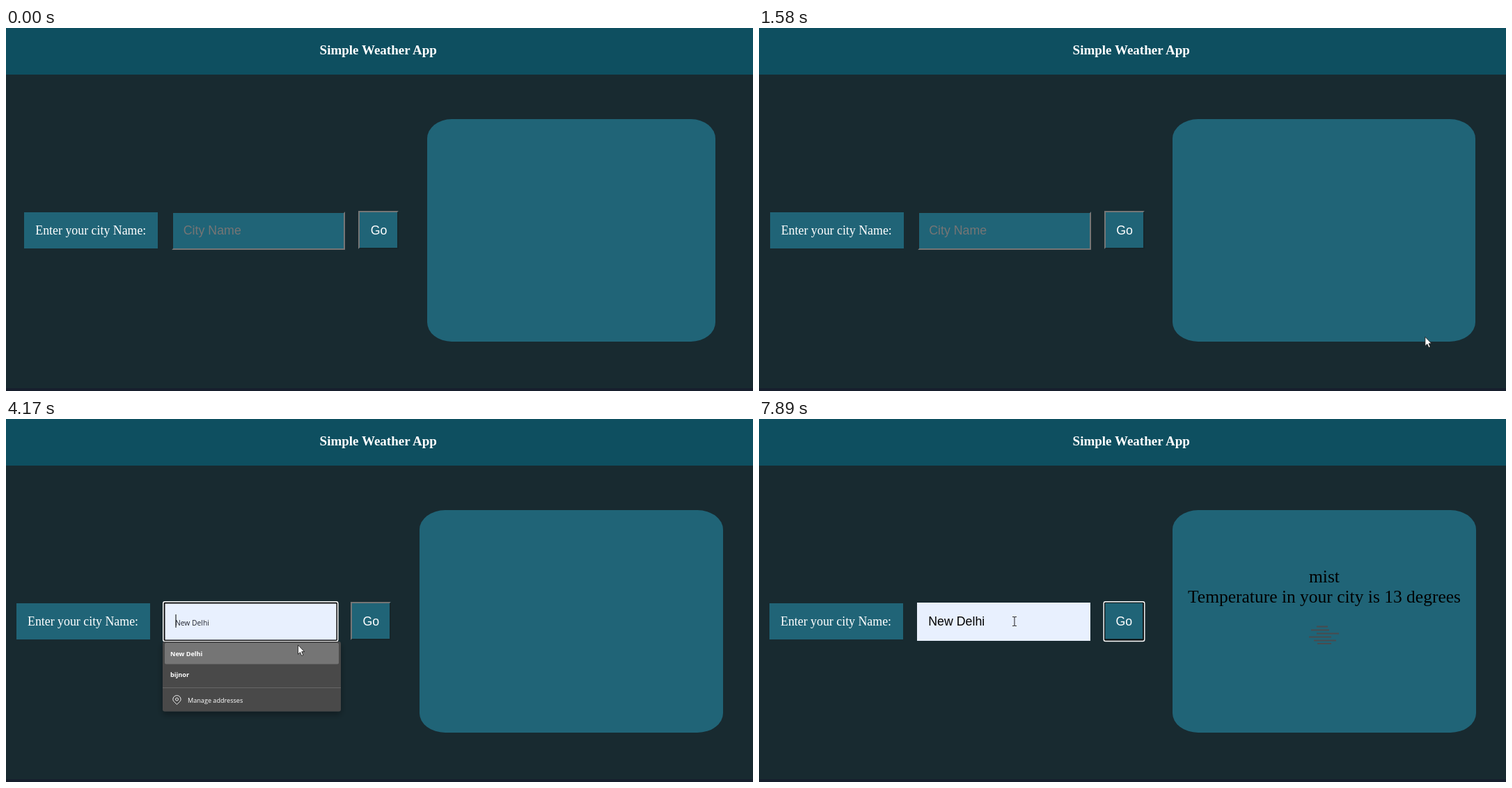
An HTML page that plays this animation: 1073 px wide and 522 px high, repeating every 8 s.

```html
<!DOCTYPE html>
<html lang="en">
<head>
<meta charset="utf-8">
<title>Simple Weather App</title>
<style>
  html, body { margin: 0; width: 100%; height: 100%; overflow: hidden; background: #182a30; }
  svg { display: block; width: 100vw; height: 100vh; }
  text { white-space: pre; }
  .serif { font-family: "Liberation Serif", "Times New Roman", serif; }
  .sans { font-family: "Liberation Sans", Arial, sans-serif; font-size: 17.8px; }
  .menu { font-family: "Open Sans", "Noto Sans", sans-serif; font-size: 9.1px; fill: #fff; }
  .bold { font-weight: 700; }
  .mid { text-anchor: middle; }
</style>
</head>
<body>
<svg viewBox="0 0 1073 522" preserveAspectRatio="none">
  <defs>
    <filter id="shadow" x="-10%" y="-10%" width="120%" height="135%">
      <feDropShadow dx="0" dy="4" stdDeviation="5" flood-color="#000" flood-opacity=".35"/>
    </filter>
  </defs>
  <rect width="1073" height="522" fill="#182a30"/>
  <rect width="1073" height="67" fill="#0e4f60"/>
  <rect y="518" width="1073" height="4" fill="#171f2d"/>
  <text class="serif bold mid" x="534.7" y="38" font-size="19" fill="#fff">Simple Weather App</text>

  <rect id="card" y="131" height="320" fill="#206477"/>
  <g id="result" class="serif mid" font-size="25.5" fill="#000">
    <text x="812" y="235">mist</text>
    <text x="812" y="264">Temperature in your city is 13 degrees</text>
    <path d="M801 298.5h16M793 303.5h26M801 308.5h32M790 313.5h32M797 318.5h32M802 323h20"
          stroke="#484b4f" stroke-width="2"/>
  </g>

  <g id="boxes">
    <rect x="15" y="265" width="192" height="52" fill="#206477"/>
    <rect id="field" x="227" y="264" width="249" height="55"/>
    <path id="inset" d="M476 264V319H227L229 317H474V266Z" fill="#767676"/>
    <path id="insetDark" d="M227 319V264H476L474 266H229V317Z" fill="#1b292d"/>
    <rect x="495" y="263" width="58" height="55" fill="#206477"/>
    <path id="outset" d="M495 318V263H553L551 265H497V316Z" fill="#767676"/>
    <path d="M553 263V318H495L497 316H551V265Z" fill="#16262b"/>
  </g>
  <g id="fieldRing" fill="none">
    <rect x="227.5" y="264.5" width="248" height="54" stroke="#101010" stroke-width="2"/>
    <rect x="225.75" y="262.75" width="251" height="57" rx="2.5" stroke="#fff" stroke-width="1.5"/>
  </g>
  <g id="goRing" fill="none">
    <rect x="496.5" y="264" width="56" height="54" stroke="#101010" stroke-width="1.5"/>
    <rect x="495.2" y="262.7" width="58.6" height="56.8" rx="2.5" stroke="#fff" stroke-width="1.4"/>
  </g>
  <g id="labels">
    <text class="serif" x="31" y="296.5" font-size="17.85" fill="#fff">Enter your city Name:</text>
    <text id="hint" class="sans" x="243.5" y="296.5" fill="#757575">City Name</text>
    <text class="sans" x="512.5" y="296.5" fill="#fff">Go</text>
  </g>
  <text id="value" class="sans" x="243.2" y="296.5" fill="#000">New Delhi</text>
  <text id="preview" class="menu" x="243" y="297" style="font-size:10.3px;fill:#23262e">New Delhi</text>
  <rect id="caret" y="281" width="1" height="19"/>

  <g id="menu">
    <rect x="225" y="320" width="256" height="100.5" rx="3" fill="#4a4a4a" filter="url(#shadow)"/>
    <rect id="hover" x="228" y="322" width="250" height="30.5" rx="2" fill="#757575"/>
    <text class="menu bold" x="236" y="341">New Delhi</text>
    <text class="menu bold" x="236" y="371">bijnor</text>
    <path d="M225 386.5H481" stroke="#666"/>
    <path d="M245.5 410.5C242 407 239.8 405.5 239.8 403.2A5.6 5.6 0 0 1 251.1 403.2C251.1 405.5 249 407 245.5 410.5Z"
          fill="none" stroke="#eee"/>
    <circle cx="245.5" cy="403" r="2" fill="none" stroke="#eee"/>
    <text class="menu" x="261" y="408">Manage addresses</text>
  </g>

  <circle id="click" r="9.5" fill="#ffff00" fill-opacity=".52"/>
  <path id="arrow" d="M0 0V13.2L3 10.4L5.2 15.4L7.4 14.4L5.2 9.6H9.2Z" fill="#fff" stroke="#101010" stroke-width=".8"/>
  <path id="beam" d="M-3 -6.5H-1L0 -5.7L1 -6.5H3M0 -5.7V5.7M-3 6.5H-1L0 5.7L1 6.5H3" fill="none" stroke-width="1.1"/>
</svg>
<script>
const LOOP = 8000;
const $ = Object.fromEntries([...document.querySelectorAll('svg [id]')].map(el => [el.id, el]));

// Pointer stops: time, x, y
const stops = [
  [160, 862, 530], [490, 907, 451], [1110, 943, 443], [1890, 966, 445], [2220, 974, 446],
  [2540, 977, 446], [2610, 977, 446], [3310, 411, 308], [4010, 411, 308], [4170, 419.5, 325],
  [4330, 419.5, 328.5], [4960, 419.5, 328.5], [5270, 518, 298], [6950, 518, 298],
  [7260, 819, 435], [7810, 360, 291], [7890, 367, 291]
];

const set = (el, attrs) => { for (const k in attrs) el.setAttribute(k, attrs[k]); };
const show = (el, on) => el.setAttribute('visibility', on ? 'visible' : 'hidden');
const within = (v, a, b) => v >= a && v < b;
const move = (el, x, y = 0) => el.setAttribute('transform', `translate(${x} ${y})`);

function pointerAt(t) {
  const i = stops.findIndex(s => s[0] > t);
  if (i < 0) return stops[stops.length - 1].slice(1);
  if (i === 0) return stops[0].slice(1);
  const [t0, x0, y0] = stops[i - 1], [t1, x1, y1] = stops[i];
  const p = (t - t0) / (t1 - t0);
  const far = Math.hypot(x1 - x0, y1 - y0) > 90;
  const k = far && i > 1 ? p * p * (3 - 2 * p) : p;
  return [x0 + (x1 - x0) * k, y0 + (y1 - y0) * k];
}

function drawPage(t) {
  const drift = t < 1900 ? 11.3 * Math.exp(-t / 570) : 0;
  const shift = Math.round(drift);
  const left = Math.round(593.7 + drift), right = Math.round(1030.2 - drift);
  const width = right - left;
  set($.card, { x: left, width, rx: width * 0.08 + 2, ry: 28 });
  move($.boxes, shift);
  move($.labels, drift);
}

function drawForm(t) {
  const fieldFocus = within(t, 3610, 5520);
  const previewing = within(t, 4090, 4640);
  const chosen = t >= 4640;
  const filled = previewing || chosen;
  set($.field, { fill: filled ? '#e8f0fe' : '#206477' });
  show($.inset, !filled);
  show($.insetDark, !filled);
  show($.fieldRing, fieldFocus);
  show($.goRing, t >= 5520);
  show($.outset, t < 5520);
  show($.hint, !filled);
  show($.preview, previewing);
  show($.value, chosen);
  show($.caret, within(t, 3610, 5120));
  set($.caret, { x: chosen ? 325 : 243.5, fill: filled ? '#000' : '#fff' });
  show($.menu, within(t, 3690, 4640));
  show($.hover, previewing);
  show($.result, t >= 6000);
}

function drawPointer(t) {
  const [x, y] = pointerAt(t);
  const overField = within(x, 227, 476) && within(y, 264, 319);
  const clicking = within(t, 3610, 3760) || within(t, 4490, 4640) || within(t, 5450, 5600);
  show($.arrow, t >= 160 && !overField);
  show($.beam, overField);
  show($.click, clicking);
  set($.beam, { stroke: t >= 4090 ? '#333' : '#e4e4e4' });
  move($.arrow, x, y);
  move($.beam, x, y);
  move($.click, x, y);
}

function draw(t) {
  drawPage(t);
  drawForm(t);
  drawPointer(t);
}

const start = performance.now();
function tick(now) {
  draw(Math.max(0, now - start) % LOOP);
  requestAnimationFrame(tick);
}
draw(0);
requestAnimationFrame(tick);
</script>
</body>
</html>
```
